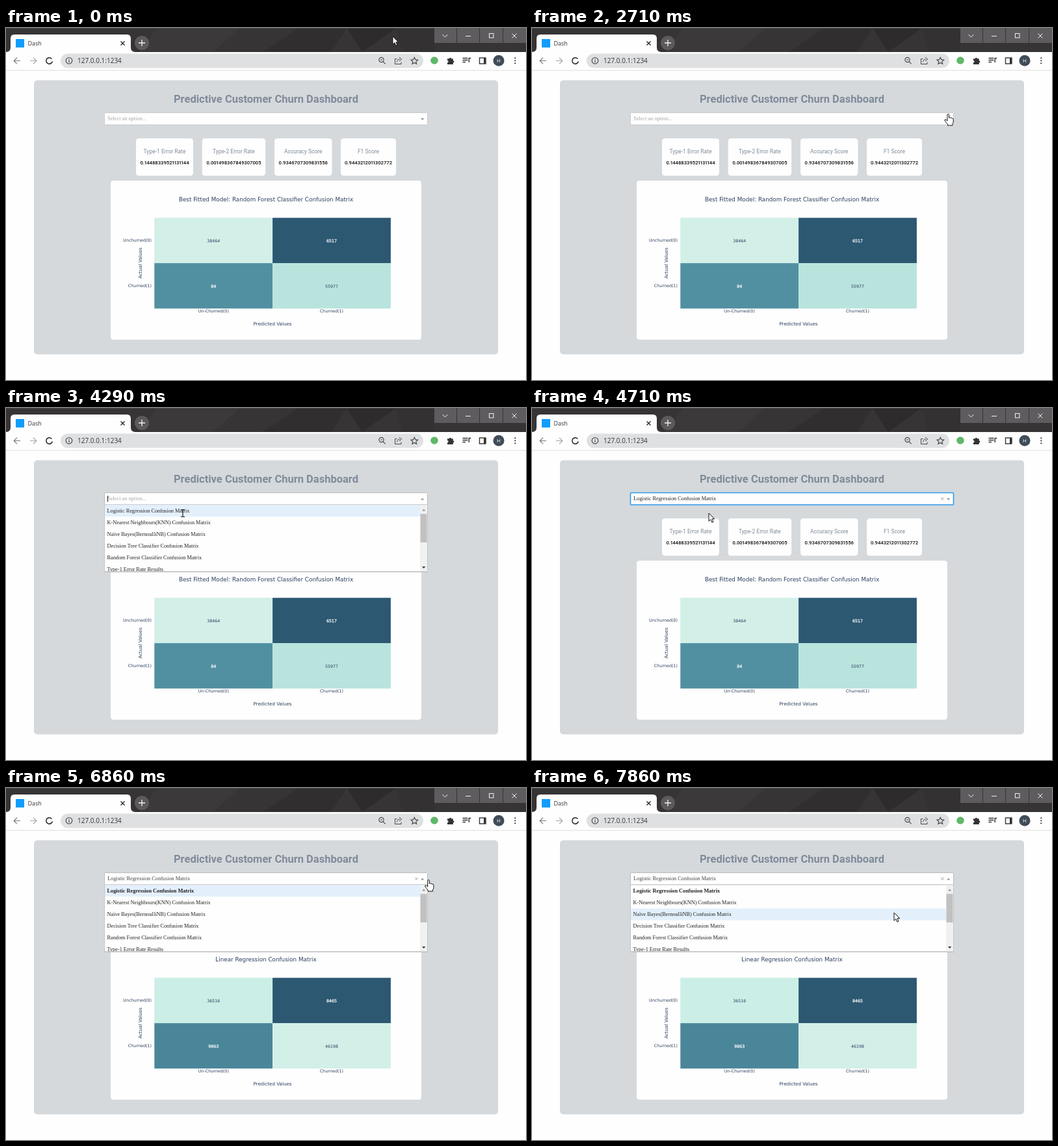
An HTML page for the animation above (8 s loop, 800 px wide and 542 px high).

```html
<!DOCTYPE html>
<html lang="en">
<head>
<meta charset="utf-8">
<title>Churn dashboard</title>
<style>
  html, body { margin: 0; width: 100%; height: 100%; overflow: hidden; background: #fefefe; }
  svg { display: block; width: 800px; height: 542px; }
  text { white-space: pre; }
  .ui { font-family: "Open Sans", "Noto Sans", sans-serif; fill: #333; }
  .din { font-family: Roboto, sans-serif; text-anchor: middle; }
  .plot { font-family: "DejaVu Sans", sans-serif; fill: #2a3f5f; text-anchor: middle; }
  .list { font: 8.27px "Liberation Serif", serif; fill: #222; }
  .line { fill: none; stroke: #46484b; stroke-width: 1.2; }
  .win { fill: none; stroke: #f4f4f4; stroke-width: 1; }
</style>
</head>
<body>
<svg viewBox="0 0 800 542">
  <!-- window frame -->
  <rect width="800" height="37" fill="#363435"/>
  <path d="M232 0H360L318 37H205z" fill="#3b393a"/>
  <path d="M395 37L450 0H524L500 37z" fill="#302e2f"/>
  <path d="M524 0H600L548 37z" fill="#2d2b2c"/>
  <path d="M600 0H659V37H610z" fill="#343133"/>
  <path d="M0 .5H800" stroke="#555" opacity=".6"/>
  <path d="M659 0H693V23H659zM694 0H728V23H694zM729 0H764V23H729zM765 0H800V23H765z" fill="#5f5c5f"/>
  <g class="win">
    <path d="M671.5 10l4 4 4-4M707 12.5h8M778.5 8.5l7 7M785.5 8.5l-7 7"/>
    <rect x="743.5" y="8.5" width="6.5" height="6.5"/>
  </g>
  <path d="M0 37Q7 37 7 30V16Q7 10 13 10H186Q192 10 192 16V30Q192 37 199 37z" fill="#fefefe"/>
  <rect x="15" y="17" width="13" height="13" fill="#119dff"/>
  <text class="ui" x="33.5" y="26.6" font-size="9">Dash</text>
  <path class="line" d="M176.5 20.5l6 6M182.5 20.5l-6 6" style="stroke:#222;stroke-width:1.3"/>
  <circle cx="209" cy="23" r="11" fill="#5d5a5c"/>
  <path class="win" d="M204 23h10M209 18v10" style="stroke-width:1.3"/>

  <!-- toolbar -->
  <rect y="37" width="800" height="28" fill="#fefefe"/>
  <path d="M0 65.2H800" stroke="#dedede"/>
  <rect x="84" y="39.5" width="558" height="22" rx="11" fill="#dfe0e1"/>
  <g class="line">
    <path d="M22 50.5H12.5M17 45.7L12.2 50.5L17 55.3" stroke="#77797c"/>
    <path d="M37 50.5h9.5M42 45.7l4.8 4.8L42 55.3" stroke="#a3a5a8"/>
    <path d="M70.3 47.4A4.8 4.8 0 1 0 71.3 51.5" stroke="#222" stroke-width="1.5"/>
    <circle cx="97" cy="50.3" r="4.8"/>
    <path d="M97 49.5v3.6M97 47.2v1.2"/>
    <circle cx="577.5" cy="49" r="3.6"/>
    <path d="M580.2 51.8l3.4 3.6M576 49h3"/>
    <path d="M601.5 47.5H598.5V55.5H608V52.5M601.5 52.5Q602 48 606 48M605 45l3.7 3-3.7 3" stroke-width="1"/>
    <path d="M628.3 45.3l1.6 3.4 3.7.4-2.8 2.5.8 3.7-3.3-1.9-3.3 1.9.8-3.7-2.8-2.5 3.7-.4z"/>
    <path d="M702.5 46.5h8M702.5 49.5h8M702.5 52.5h4.5M712.3 53V46.5h3" stroke="#333" stroke-width="1.4"/>
    <rect x="728.5" y="46" width="9.5" height="9" stroke="#333" stroke-width="1.4"/>
  </g>
  <path d="M679 47.3h2.8a1.6 1.6 0 1 1 3.2 0h2.8v2.9a1.6 1.6 0 1 1 0 3.2v2.6H679v-2.7a1.6 1.6 0 1 0 0-3.2zM735 46h3v9h-3z" fill="#333"/>
  <text class="ui" x="110" y="54" font-size="10">127.0.0.1:1234</text>
  <circle cx="659" cy="50" r="5.8" fill="#5fb768"/>
  <circle cx="758" cy="50.3" r="8.5" fill="#3f4c58"/>
  <text class="ui" x="758" y="53.3" font-size="8" text-anchor="middle" style="fill:#fff">H</text>
  <path d="M783.3 46.3v.01M783.3 50.3v.01M783.3 54.3v.01" stroke="#333" stroke-width="2.2" stroke-linecap="round"/>

  <!-- page -->
  <rect x="43" y="80.5" width="714" height="422" rx="5" fill="#d5d9dc"/>
  <text class="din" x="400" y="114.8" font-size="16.5" font-weight="700" fill="#7f8b99">Predictive Customer Churn Dashboard</text>
  <rect x="161" y="235" width="478" height="245" rx="4.5" fill="#fefefe"/>
  <g id="before"></g>
  <g id="after"></g>
  <g class="plot" font-size="6.4">
    <text x="319.3" y="438.4">Un-Churned(0)</text>
    <text x="501" y="438.4">Churned(1)</text>
    <text x="224" y="329.2" text-anchor="end" style="text-anchor:end">Unchurned(0)</text>
    <text x="224" y="399.2" style="text-anchor:end">Churned(1)</text>
    <text x="410" y="458.4" font-size="7.15">Predicted Values</text>
    <text transform="translate(209 362) rotate(-90)" font-size="7.1">Actual Values</text>
  </g>

  <!-- select box -->
  <rect id="box" x="151.5" y="130.5" width="497" height="18.5" rx="1" fill="#fefefe"/>
  <text id="choice" class="list" x="156.3" y="142.3"></text>
  <path id="clear" d="M629.3 137.6l4.2 4.2M633.5 137.6l-4.2 4.2" stroke="#999" stroke-width=".9"/>
  <path id="mark" fill="#999"/>
  <g id="menu">
    <rect x="151.5" y="149" width="497" height="103" fill="#fefefe" stroke="#c4c4c4"/>
    <rect id="hover" x="152" width="485" height="18" fill="#e3f0fc"/>
    <path id="caret" d="M156.5 135v9.5" stroke="#222"/>
    <svg class="list" id="options" x="152" y="149.5" width="485" height="102.3"></svg>
    <rect x="637" y="149.5" width="11" height="102" fill="#f1f1f1"/>
    <rect x="637.5" y="163" width="10" height="44" fill="#c1c1c1"/>
    <path d="M640 158.5h5.4l-2.7-3.2z" fill="#999"/>
    <path d="M640 244h5.4l-2.7 3.2z" fill="#444"/>
    <path d="M152 252.3H648.5" stroke="#b5b5b5"/>
  </g>

  <g id="cursor" fill="#fff" stroke="#111" stroke-width="1" stroke-linejoin="round">
    <path id="arrow" d="M0 0V12.3L2.9 9.6L4.9 14.2L6.9 13.3L5 8.8H8.8z"/>
    <path id="hand" d="M-1.3 1.2Q0-.6 1.3 1.2V6.2Q2.6 5.2 3.8 6.5Q5 5.8 6 7.1Q7.4 6.6 7.9 8.3V12.5Q7.6 14.5 6.6 15.5V18H-.8V16.2Q-3.6 13.5-5.4 10.2Q-5.3 8.2-3.3 9.2L-1.3 11z"/>
    <path id="beam" d="M-3-5.5H-1L0-5L1-5.5H3M0-5V5M-3 5.5H-1L0 5L1 5.5H3" fill="none" stroke-width="1.1"/>
  </g>
</svg>
<script>
const $ = id => document.getElementById(id);
const show = (id, on) => $(id).style.display = on ? '' : 'none';

const PICK = 'Logistic Regression Confusion Matrix';
const OPTIONS = [PICK, 'K-Nearest Neighbours(KNN) Confusion Matrix',
  'Naïve Bayes(BernoulliNB) Confusion Matrix', 'Decision Tree Classifier Confusion Matrix',
  'Random Forest Classifier Confusion Matrix', 'Type-1 Error Rate Results'];
const LABELS = ['Type-1 Error Rate', 'Type-2 Error Rate', 'Accuracy Score', 'F1 Score'];
const ROW = 18.1, TOP = 149.3;

// the digit 1 is set narrower than the others
const kern = s => [...s].map((c, i) => -.58 * ((c === '1') + (s[i - 1] === '1'))).join(' ');

function card([x, w], label, value) {
  const mid = x + w / 2;
  return `<rect x="${x}" y="170" width="${w}" height="57.5" rx="4.5" fill="#fefefe"/>
    <text class="din" x="${mid}" y="193" font-size="8.5" fill="#7f8b99">${label}</text>
    <text class="din" x="${mid}" y="209.8" font-size="7.7" font-weight="500" fill="#111"
      dx="${kern(value)}">${value}</text>`;
}

function cell(i, color, n) {
  const x = 228.3 + i % 2 * 181.8, y = 292.3 + (i >> 1) * 69.8;
  const light = i === 1 || i === 2;
  const ink = light ? 'style="fill:#fff" stroke="#fff" stroke-width=".25"' : '';
  return `<rect x="${x}" y="${y}" width="181.8" height="69.8" fill="${color}"/>
    <text class="plot" x="${x + 91}" y="${y + 37.5}" font-size="6.3" ${ink}>${n}</text>`;
}

const results = (title, boxes, scores, colors, counts) =>
  LABELS.map((l, i) => card(boxes[i], l, scores[i])).join('') +
  `<text class="plot" x="400" y="266.6" font-size="8.8">${title}</text>` +
  counts.map((n, i) => cell(i, colors[i], n)).join('');

$('before').innerHTML = results('Best Fitted Model: Random Forest Classifier Confusion Matrix',
  [[200, 88], [301.7, 97.5], [413, 88.5], [515, 85]],
  ['0.14488339521131144', '0.001498367849307005', '0.9346707309831556', '0.9443212011302772'],
  ['#d2efe8', '#2c5872', '#5190a1', '#b9e4dd'], [38464, 6517, 84, 55977]);
$('after').innerHTML = results('Linear Regression Confusion Matrix',
  [[205, 90], [307.7, 91.5], [413, 88.5], [515, 80]],
  ['0.18819056935150397', '0.17593335830613083', '0.8186100829358088', '0.83447129800224'],
  ['#cbeee6', '#2c5872', '#4a8699', '#d2efe8'], [36516, 8465, 9863, 46198]);
$('options').innerHTML = OPTIONS.map((o, i) =>
  `<text x="3.5" y="${11.4 + i * ROW}">${o}</text>`).join('');

const linear = u => u, out = u => u * (2 - u), smooth = u => u * u * (3 - 2 * u);
// tick, x, y, easing towards this point
const PATH = [
  [13, 595, 13, linear], [20, 643, 139, smooth],
  [21, 643, 139, linear], [30, 272, 162, smooth],
  [38, 272, 162, linear], [41, 496, 178.5, linear], [46, 650, 141, out],
  [49, 650, 141, linear], [55, 557, 192, smooth]
];
const OPEN1 = 22, CHOSEN = 32, UPDATED = 34, OPEN2 = 47;

function pointer(k) {
  const i = PATH.findIndex(p => p[0] >= k);
  if (i === 0) return PATH[0].slice(1, 3);
  if (i < 0) return PATH[PATH.length - 1].slice(1, 3);
  const [k0, x0, y0] = PATH[i - 1], [k1, x1, y1, ease] = PATH[i];
  const u = ease((k - k0) / (k1 - k0));
  return [x0 + (x1 - x0) * u, y0 + (y1 - y0) * u];
}

function draw(t) {
  const k = Math.floor((t + 5) * 7 / 1000);
  const [x, y] = pointer(k);
  const chosen = k >= CHOSEN, updated = k >= UPDATED;
  const open = k >= OPEN1 && !chosen || k >= OPEN2;
  const focus = chosen && !open;

  show('before', !updated);
  show('after', updated);
  show('menu', open);
  show('caret', !chosen);
  show('clear', chosen);
  $('choice').textContent = chosen ? PICK : 'Select an option...';
  $('choice').style.fill = !chosen ? '#a5a5a5' : open ? '#444' : '#222';
  $('box').setAttribute('stroke', focus ? '#2f9bea' : open ? '#bbb' : '#ccc');
  $('box').setAttribute('stroke-width', focus ? 1.6 : 1);
  $('mark').setAttribute('d', open ? 'M638 141.5h5.4l-2.7-3z' : 'M638 139h5.4l-2.7 3z');
  $('hover').setAttribute('y', TOP + ROW * Math.max(0, Math.floor((y - TOP) / ROW)));
  $('options').firstChild.style.fontWeight = chosen ? 700 : 400;

  const hand = y > 130 && y < 149 && x > 634;
  const beam = open && !hand && y > TOP && x < 315;
  show('hand', hand);
  show('beam', beam);
  show('arrow', !hand && !beam);
  $('cursor').setAttribute('transform', `translate(${x.toFixed(1)} ${y.toFixed(1)})`);
}

const start = performance.now();
function loop() {
  draw((performance.now() - start) % 8000);
  requestAnimationFrame(loop);
}
loop();
</script>
</body>
</html>
```
